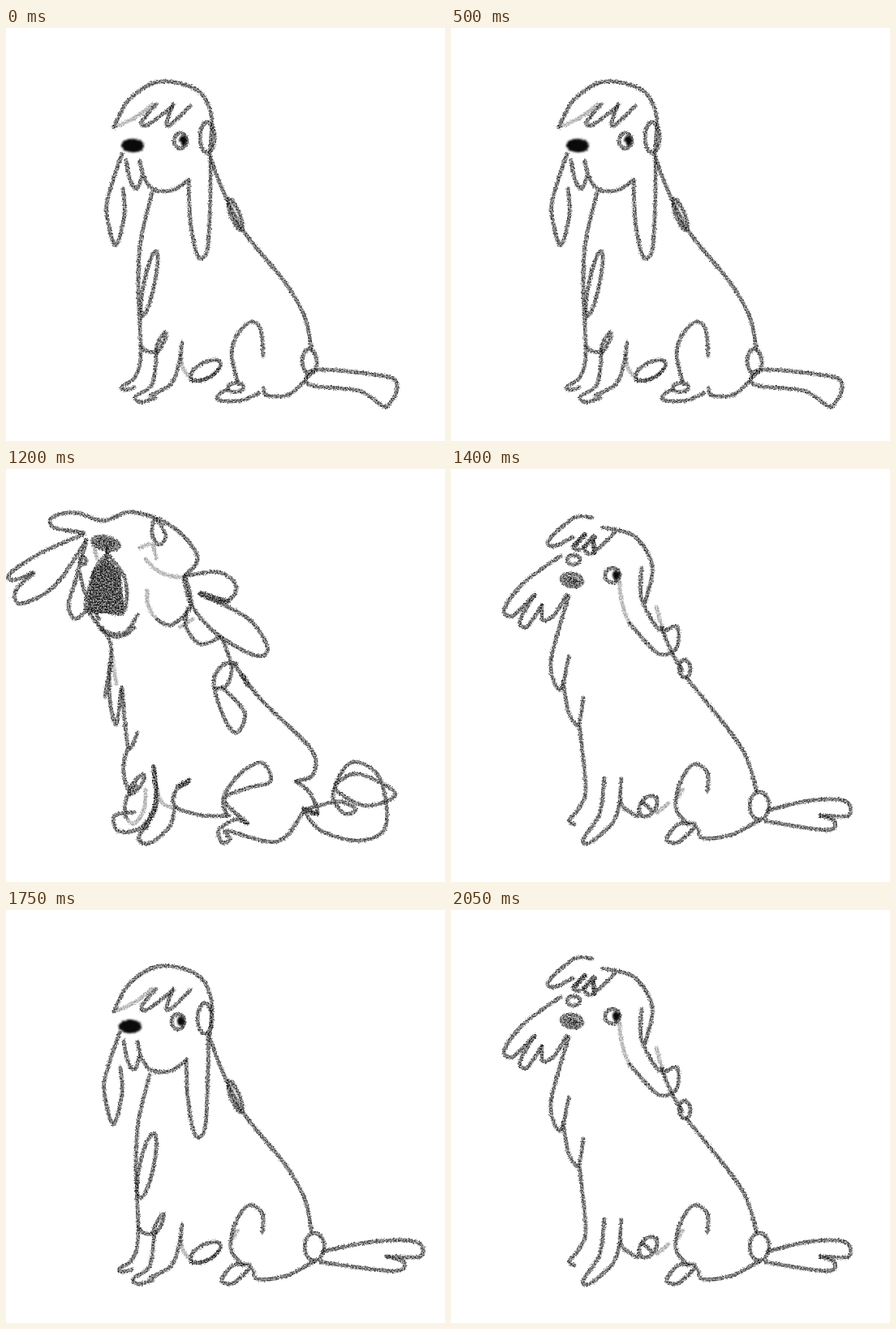
An HTML page for the animation above (2100 ms loop, 541x509 px).

```html
<!DOCTYPE html>
<html lang="en">
<head>
<meta charset="utf-8">
<title>Barking dog sketch</title>
<style>
html, body { margin: 0; width: 100%; height: 100%; overflow: hidden; background: #fff; }
svg { display: block; width: 100vw; height: 100vh; }
path { fill: none; stroke: #141414; stroke-width: 4.8; stroke-linecap: round; stroke-linejoin: round; stroke-opacity: .74; }
.light { stroke-opacity: .36; }
.dark { stroke-width: 6; stroke-opacity: .9; }
.fill { fill: #141414; fill-opacity: .8; }
.ink { fill: #0a0a0a; stroke: none; }
</style>
</head>
<body>
<svg id="stage" viewBox="0 0 541 509">
  <defs>
    <filter id="crayon" filterUnits="userSpaceOnUse" x="0" y="0" width="541" height="509" color-interpolation-filters="sRGB">
      <feTurbulence type="fractalNoise" baseFrequency=".55" numOctaves="2" seed="4" result="noise"/>
      <feDisplacementMap in="SourceGraphic" in2="noise" scale="4" xChannelSelector="R" yChannelSelector="G" result="rough"/>
      <feColorMatrix in="noise" values="0 0 0 0 0  0 0 0 0 0  0 0 0 0 0  0 0 2.4 0 -.7" result="grain"/>
      <feComposite in="rough" in2="grain" operator="in" result="specks"/>
      <feComposite in="specks" in2="rough" operator="arithmetic" k2=".8" k3=".36"/>
      <feGaussianBlur stdDeviation=".6"/>
    </filter>
    <filter id="soft" filterUnits="userSpaceOnUse" x="0" y="0" width="541" height="509" color-interpolation-filters="sRGB">
      <feTurbulence type="fractalNoise" baseFrequency=".4" numOctaves="2" seed="7" result="noise"/>
      <feDisplacementMap in="SourceGraphic" in2="noise" scale="5" xChannelSelector="R" yChannelSelector="G"/>
      <feGaussianBlur stdDeviation=".9"/>
    </filter>
  </defs>
</svg>
<script>
const stage = document.getElementById('stage');
const node = (parent, tag, attrs) => {
  const el = document.createElementNS('http://www.w3.org/2000/svg', tag);
  for (const key in attrs) el.setAttribute(key, attrs[key]);
  return parent.appendChild(el);
};

// Catmull-Rom spline as cubic Béziers
function spline(points, closed) {
  const n = points.length;
  const at = i => points[closed ? (i + n) % n : Math.min(n - 1, Math.max(0, i))];
  let d = 'M' + points[0];
  for (let i = 0; i < (closed ? n : n - 1); i++) {
    const [a, b, c, e] = [at(i - 1), at(i), at(i + 1), at(i + 2)];
    d += 'C' + [0, 1].map(k => b[k] + (c[k] - a[k]) / 6) + ' ' + [0, 1].map(k => c[k] - (e[k] - b[k]) / 6) + ' ' + c;
  }
  return d + (closed ? 'Z' : '');
}

let layers, warp, offset;
const move = (x, y) => { offset = [x, y]; };

function brush(tone) {
  const stroke = (points, closed) => node(tone === 'ink' ? layers.ink : layers.crayon, 'path', {
    class: tone,
    d: spline(points.map(([x, y]) => warp([x + offset[0], y + offset[1]])), closed)
  });
  const pairs = flat => flat.flatMap((x, i) => i % 2 ? [] : [[x, flat[i + 1]]]);
  return {
    curve: (...flat) => stroke(pairs(flat)),
    shape: (...flat) => stroke(pairs(flat), true),
    // bow is the bulge relative to the length; positive bulges down when going right
    arc: (x, y, x2, y2, bow = 0) => stroke([0, .25, .5, .75, 1].map(t => {
      const bulge = 4 * bow * t * (1 - t), dx = x2 - x, dy = y2 - y;
      return [x + dx * t - dy * bulge, y + dy * t + dx * bulge];
    })),
    // ellipse given by the ends of one axis and its width
    loop: (x, y, x2, y2, width) => {
      const dx = (x2 - x) / 2, dy = (y2 - y) / 2, k = width / 2 / Math.hypot(dx, dy);
      stroke(Array.from({ length: 10 }, (_, i) => {
        const c = Math.cos(i * Math.PI / 5), s = Math.sin(i * Math.PI / 5) * k;
        return [x + dx + dx * c - dy * s, y + dy + dy * c + dx * s];
      }), true);
    }
  };
}
const pencil = brush(''), light = brush('light'), dark = brush('dark'), fill = brush('fill'), ink = brush('ink');

function sitHead(p) {
  move(0, p.dome);
  pencil.curve(133,122, 152,88, 190,66, 236,77, 253,108, 251,152);
  light.arc(133,122, 180,94, .06);
  for (const i of [0, 1]) {
    pencil.curve(185 + 21 * i, 94, 167 + 31 * i, 116, 175 + 28 * i, 119, 206 + 21 * i, 96);
  }
  move(p.face, p.face / 2);
  ink.loop(142,145, 170,145, 17);
  pencil.loop(207,139, 223,139, 19);
  ink.loop(214,139, 223,138, 12);
  pencil.loop(248,116, 248,154, 18);
  pencil.curve(148,163, 152,184, 158,197, 163,196, 167,183);
  pencil.curve(165,164, 170,184, 182,199, 205,200, 225,187);
  move(p.face, p.ear);
  pencil.curve(143,155, 128,200, 124,228, 135,268, 146,230, 144,198);
  pencil.curve(225,188, 227,235, 234,275, 241,284, 249,268, 252,200, 252,157);
}

function sitBody(p) {
  move(p.rump, 0);
  pencil.curve(251,157, 266,197, 291,248, 345,315, 368,356, 376,394);
  pencil.loop(275,211, 290,249, 11);
  light.arc(276,214, 289,247, 0);
  move(p.body, 0);
  pencil.curve(180,203, 166,262, 163,315, 166,400, 159,430, 143,442, 147,446, 158,443);
  pencil.loop(185,275, 168,355, p.chest);
  pencil.arc(166,391, 187,398, .2);
  pencil.loop(197,375, 185,400, 6);
  pencil.curve(186,398, 180,439, 160,454, 166,461, 184,456);
  move(0, 0);
  pencil.curve(217,388, 214,410, 204,438, 178,453);
  light.arc(215,405, 226,430, .1);
  pencil.loop(228,432, 264,412, 19);
  pencil.arc(229,434, 262,420, .15);
}

function sitRear(p) {
  move(-p.foot / 3, 0);
  pencil.curve(317,404, 314,372, 302,362, 285,378, 278,402, 285,435);
  move(p.foot, p.foot);
  pencil.loop(273,444, 293,442, 11);
  pencil.curve(274,445, 262,452, 264,459, 290,459, 312,450);
  move(p.rump, 0);
  pencil.curve(317,444, 322,453, 350,451, 377,425);
  pencil.loop(373,396, 375,426, 18);
  move(p.rump, p.tail);
  pencil.shape(370,430, 382,421, 430,424, 474,431, 482,444, 474,461, 465,466, 435,447, 378,441);
}

function sit(p, rear = sitRear) {
  sitHead(p);
  sitBody(p);
  rear(p);
}

function barkHead() {
  pencil.curve(96,79, 62,73, 54,65, 62,57, 88,54, 120,64, 155,53, 205,71, 236,108, 220,132);
  pencil.shape(183,62, 180,80, 188,93, 197,84, 190,68);
  pencil.curve(94,81, 40,105, 4,130, 10,137, 33,128);
  pencil.curve(34,128, 12,150, 18,166, 60,144, 99,88);
  pencil.curve(99,88, 85,140, 77,168, 85,185, 102,172);
  pencil.loop(91,113, 99,113, 9);
  pencil.arc(91,128, 115,185, .06);
  pencil.loop(107,88, 139,95, 15);
  fill.loop(112,89, 134,94, 8);
  dark.arc(125,98, 125,107);
  light.arc(107,88, 112,110);
  // open mouth, shaded with upright hatching
  pencil.curve(125,105, 112,119, 104,143, 99,173, 122,175, 145,176, 147,136, 126,106);
  for (let x = 103; x < 147; x += 5) {
    dark.arc(x + (125 - x) * .25, 112 + Math.abs(x - 123) * .8, x, 175);
  }
  pencil.curve(103,178, 122,200, 146,202, 162,180);
  pencil.arc(115,195, 158,195, .28);
  light.curve(165,97, 180,93, 185,110);
  light.arc(172,111, 222,133, .14);
  light.arc(174,150, 187,186, .13);
  pencil.curve(187,186, 204,192, 228,168, 220,132);
  pencil.curve(220,132, 262,127, 284,145, 270,164, 240,154);
  dark.arc(240,153, 272,163);
  pencil.curve(240,155, 298,184, 322,220, 308,230, 262,205, 230,170, 219,136);
  pencil.curve(224,172, 222,195, 240,216, 264,207);
  light.arc(214,195, 230,185);
}

function barkBody() {
  pencil.curve(118,195, 130,222, 122,280);
  pencil.curve(128,240, 128,285, 136,315, 142,270);
  pencil.curve(143,270, 147,318, 152,345, 162,325);
  pencil.arc(150,345, 153,400, .12);
  light.arc(130,225, 136,265);
  pencil.curve(266,208, 278,243, 272,267, 257,270);
  pencil.curve(284,240, 268,241, 256,262, 268,305, 284,325, 294,300, 266,269);
  pencil.curve(280,239, 315,285, 375,344, 379,376, 357,385);
  dark.arc(292,255, 298,266);
  pencil.loop(170,377, 153,400, 9);
  pencil.arc(160,390, 148,430, .15);
  light.curve(148,430, 158,437, 170,420, 172,395);
  pencil.curve(158,423, 134,427, 138,446, 165,443, 185,418);
  dark.curve(182,367, 185,410, 172,442);
  pencil.curve(172,440, 163,456, 178,461, 202,440, 208,418);
  light.arc(187,395, 203,417, .2);
  pencil.curve(226,383, 211,393, 208,415, 242,427, 275,427);
  dark.arc(225,384, 213,391, -.1);
}

function barkRear() {
  pencil.curve(272,427, 268,405, 288,376, 315,362, 326,385, 295,394, 269,408, 298,437);
  pencil.curve(298,437, 282,432, 262,446, 267,461, 276,456, 273,446, 335,459, 368,420);
  pencil.curve(358,385, 375,400, 384,425, 366,419);
  pencil.curve(367,420, 410,410, 431,420, 416,424, 403,400, 425,362, 460,380, 468,440, 435,458, 387,445, 367,420);
  pencil.shape(407,388, 435,376, 480,400, 445,415, 412,400);
  dark.arc(367,419, 383,425);
}

function bark() {
  barkHead();
  barkBody();
  barkRear();
}

function swingRear() {
  move(0, 0);
  pencil.curve(316,397, 316,374, 299,364, 283,385, 277,418, 292,438);
  light.arc(279,405, 285,395);
  pencil.curve(300,437, 280,438, 266,456, 280,460, 302,440);
  pencil.curve(305,444, 310,455, 345,451, 380,433);
  pencil.loop(380,398, 380,432, 24);
  pencil.curve(390,421, 440,409, 485,409, 490,427, 455,427);
  pencil.curve(456,427, 473,434, 462,445, 388,434);
}

function swing() {
  pencil.curve(174,60, 152,60, 120,88, 128,95, 150,84);
  for (const i of [0, 1]) {
    pencil.curve(165 + 13 * i, 80 + 4 * i, 151 + 14 * i, 95 + 2 * i, 160 + 14 * i, 99 + 5 * i, 176 + 26 * i, 82 - 4 * i);
    dark.arc(164 + 11 * i, 82 + 4 * i, 153 + 24 * i, 94 + 8 * i);
  }
  pencil.loop(143,112, 159,112, 12);
  pencil.loop(136,135, 162,139, 16);
  fill.loop(141,136, 157,139, 6);
  pencil.loop(190,131, 208,131, 18);
  ink.loop(199,131, 208,131, 12);
  pencil.curve(135,107, 90,140, 66,172, 76,181, 103,155);
  pencil.curve(103,155, 85,187, 94,194, 112,168);
  pencil.curve(112,168, 113,186, 127,180, 143,155);
  pencil.curve(187,72, 226,83, 248,120, 239,165);
  pencil.curve(235,122, 235,160, 257,198, 278,194, 278,220, 255,227, 220,190);
  light.arc(220,190, 208,140, -.06);
  light.arc(253,170, 260,195);
  pencil.arc(260,195, 285,248, .04);
  pencil.loop(287,235, 289,257, 14);
  pencil.curve(290,257, 345,325, 366,360, 376,396);
  pencil.curve(145,157, 123,238, 135,272, 145,231);
  pencil.curve(138,262, 145,300, 157,315, 163,282);
  pencil.curve(158,315, 166,390, 160,415, 146,433, 152,438);
  pencil.curve(189,381, 183,425, 163,456, 172,460, 200,435, 208,410);
  pencil.curve(210,382, 210,413, 230,428);
  pencil.loop(235,427, 251,404, 19);
  pencil.arc(236,410, 246,420);
  light.arc(254,424, 268,412);
  swingRear();
}

const calm = { dome: 0, face: 0, ear: 0, body: 0, chest: 13, rump: 0, foot: 0, tail: 0 };
const upright = { dome: 0, face: -2, ear: -3, body: -3, chest: 13, rump: 1, foot: 5, tail: -3 };
const lean = { dome: 3, face: -3, ear: -4, body: -3, chest: 17, rump: 0, foot: 5, tail: 0 };
const mix = (a, b, t) => Object.fromEntries(Object.keys(a).map(key => [key, a[key] + (b[key] - a[key]) * t]));

const lift = ([x, y]) => [x, y - 27 * Math.min(1, Math.max(0, (210 - y) / 150))];
const stretch = ([x, y]) => [x + Math.max(0, x - 390) * .21, y];

function build(draw, bend = point => point) {
  const group = node(stage, 'g', { display: 'none' });
  layers = {
    crayon: node(group, 'g', { filter: 'url(#crayon)' }),
    ink: node(group, 'g', { filter: 'url(#soft)' })
  };
  warp = bend;
  move(0, 0);
  draw();
  return group;
}

const idle = [calm, upright, mix(upright, lean, .35), mix(upright, lean, .7), lean].map(p => build(() => sit(p)));
const ready = build(() => sit(lean, swingRear), stretch);
const turn = build(swing);
const woof = [
  [ready, 50], [turn, 50], [build(bark), 100],
  [build(bark, point => stretch(lift(point))), 100], [turn, 50]
];
const rest = count => Array.from({ length: count }, (_, i) => [idle[i % idle.length], 100]);
const timeline = [...rest(11), ...woof, ...rest(3), ...woof];
const LOOP = 2100;
let shown;

function render(time) {
  let left = time % LOOP;
  const [pose] = timeline.find(([, hold]) => (left -= hold) < 0);
  if (pose === shown) return;
  shown?.setAttribute('display', 'none');
  pose.removeAttribute('display');
  shown = pose;
}

function tick() {
  render(performance.now());
  requestAnimationFrame(tick);
}
tick();
</script>
</body>
</html>
```
